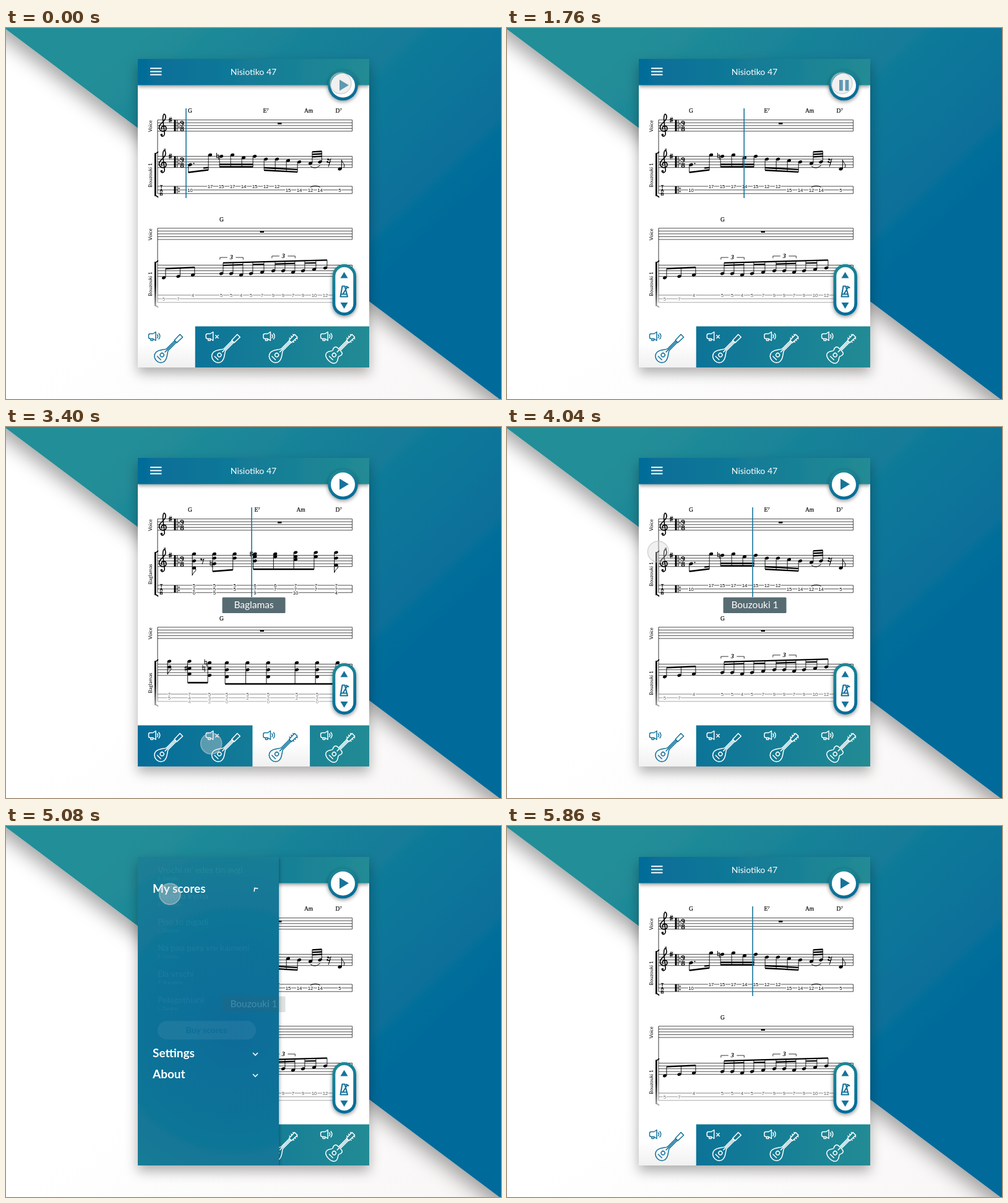
These frames come from a looping animation (800x600 px, 7860 ms). An HTML page:

```html
<!DOCTYPE html>
<html lang="en">
<head>
<meta charset="utf-8">
<title>Score player</title>
<style>
html, body { margin: 0; width: 100%; height: 100%; overflow: hidden; background: #fff; }
svg { display: block; width: 800px; height: 600px; }
text { font-family: Lato, sans-serif; }
.serif { font-family: "Liberation Serif", serif; }
.sans { font-family: "Liberation Sans", sans-serif; }
.bold { font-weight: bold; }
.mid { text-anchor: middle; }
.line { fill: none; stroke: currentColor; stroke-width: 1.5; stroke-linejoin: round; stroke-linecap: round; }
.thick { stroke-width: 2.1; }
.tab { color: #fff; }
.tab.on { color: #11729b; }
.tab rect { visibility: hidden; }
.tab.on rect { visibility: visible; }
</style>
</head>
<body>
<svg viewBox="0 0 800 600">
  <defs>
    <linearGradient id="sky" gradientUnits="userSpaceOnUse" x1="230" y1="0" x2="610" y2="410">
      <stop stop-color="#238e97"/><stop offset="1" stop-color="#036b9a"/>
    </linearGradient>
    <linearGradient id="bar" gradientUnits="userSpaceOnUse" x1="213" y1="0" x2="587" y2="0">
      <stop stop-color="#056c99"/><stop offset="1" stop-color="#228b94"/>
    </linearGradient>
    <linearGradient id="ring" x1="0" y1="0" x2=".3" y2="1">
      <stop stop-color="#228b94"/><stop offset="1" stop-color="#056c99"/>
    </linearGradient>
    <linearGradient id="paper" x1="0" y1="0" x2="1" y2="1">
      <stop offset=".5" stop-color="#fff"/><stop offset="1" stop-color="#f8f6f5"/>
    </linearGradient>
    <linearGradient id="chosen" x1="0" y1="0" x2="0" y2="1">
      <stop offset=".4" stop-color="#fff"/><stop offset="1" stop-color="#f0f0f0"/>
    </linearGradient>
    <linearGradient id="fade" x1="0" y1="0" x2="0" y2="1">
      <stop stop-color="#fff" stop-opacity="0"/><stop offset="1" stop-color="#fff" stop-opacity=".9"/>
    </linearGradient>
    <radialGradient id="drawer" gradientUnits="userSpaceOnUse" cx="370" cy="330" r="320">
      <stop stop-color="#076c99"/><stop offset=".5" stop-color="#0e7397"/><stop offset="1" stop-color="#1d8095"/>
    </radialGradient>
    <clipPath id="screen"><rect x="213" y="50" width="374" height="499"/></clipPath>
    <filter id="far" x="-20%" y="-20%" width="140%" height="140%">
      <feDropShadow dx="-3" dy="15" stdDeviation="15" flood-opacity=".35"/>
    </filter>
    <filter id="lift" x="-20%" y="-20%" width="140%" height="140%">
      <feDropShadow dx="0" dy="9" stdDeviation="10" flood-opacity=".32"/>
    </filter>
    <filter id="near" x="-30%" y="-30%" width="160%" height="170%">
      <feDropShadow dx="0" dy="2" stdDeviation="3" flood-opacity=".45"/>
    </filter>
  </defs>

  <rect width="800" height="600" fill="url(#paper)"/>
  <path d="M-60-43V-60H860V647Z" fill="url(#sky)" filter="url(#far)"/>
  <rect x="213" y="50" width="374" height="499" fill="#fff" filter="url(#lift)"/>

  <g clip-path="url(#screen)">
    <g id="common"></g>
    <g id="bouzouki"></g>
    <g id="baglamas"></g>
    <rect x="237" y="415" width="325" height="50" fill="url(#fade)"/>
    <path id="cursor" d="M0 130V275" stroke="#17739c" stroke-width="1.6"/>
    <rect x="213" y="50" width="374" height="42.5" fill="url(#bar)" filter="url(#near)"/>
    <path d="M233 65.3h18.5M233 70.4h18.5M233 75.5h18.5" stroke="#fff" stroke-width="2"/>
    <text class="mid" x="400" y="76" font-size="14" fill="#fff">Nisiotiko 47</text>
    <rect x="213" y="482.5" width="374" height="67" fill="url(#bar)"/>
    <g id="tabs"></g>

    <g id="menu">
      <rect x="213" y="50" width="228" height="499" fill="url(#drawer)" filter="url(#near)"/>
      <g id="list" fill="#fff"></g>
      <g class="bold" fill="#fff" font-size="19">
        <text x="237" y="107.5">My scores</text>
        <g id="rest"><text x="237" y="438">Settings</text><text x="237" y="472">About</text>
          <path d="M399 430.500l4 4 4-4M399 465l4 4 4-4" fill="none" stroke="#fff" stroke-width="1.6"/></g>
      </g>
      <path id="chevron" d="M-4-2L0 2 4-2" fill="none" stroke="#fff" stroke-width="1.6"/>
    </g>
  </g>

  <g filter="url(#near)">
    <circle cx="544.5" cy="93" r="24.3" fill="url(#ring)"/>
    <circle cx="544.5" cy="93" r="19.5" fill="#fff"/>
  </g>
  <path id="play" d="M539 83.5V101.5L554 92.5Z" fill="#17739a"/>
  <path id="pause" d="M537 84h5.8v17.5H537ZM546.6 84h5.8v17.5h-5.8Z" fill="#17739a"/>

  <g filter="url(#near)">
    <rect x="527.5" y="382" width="38.5" height="83" rx="19.2" fill="url(#ring)"/>
    <rect x="532.3" y="386.8" width="29" height="73.4" rx="14.5" fill="#fff"/>
  </g>
  <g fill="#17739a" color="#17739a">
    <path d="M540.5 404.5H552.5L546.5 394.5ZM540.5 444H552.5L546.5 454Z"/>
    <path class="line thick" d="M543.5 417.5h4l4.5 17h-11.5ZM541 430.5h10M545 429.5l6.5-10.5M550 418l3.5 2"/>
  </g>

  <g id="toast">
    <rect x="349.5" y="275.5" width="102" height="25.5" rx="1.5" fill="#455b63" fill-opacity=".9"/>
    <text id="toastText" class="mid" x="400.5" y="293" font-size="15.5" fill="#fff"></text>
  </g>
  <circle id="touch" r="17" fill="rgb(215,215,215)" fill-opacity=".38" stroke="rgb(195,195,195)" stroke-opacity=".7" stroke-width="1.4"/>
</svg>

<script>
const $ = id => document.getElementById(id);

// Engraving helpers
const GAP = 4.55, TAB_GAP = 5.9;
const path = (d, w = 1, fill = 'none') => `<path d="${d}" fill="${fill}" stroke="#000" stroke-width="${w}"/>`;
const text = (x, y, s, size, cls = '', extra = '') =>
  `<text x="${x}" y="${y}" font-size="${size}" class="${cls}" ${extra}>${s}</text>`;
const dot = (x, y, r = 1.1) => `<circle cx="${x}" cy="${y}" r="${r}"/>`;
const staff = (y, n = 5, gap = GAP) => {
  let d = `M559.5 ${y}v${(n - 1) * gap}`;
  for (let i = 0; i < n; i++) d += `M245 ${y + i * gap}H559.5`;
  return path(d, .7);
};
const label = (y, s) => text(0, 0, s, 8, 'mid', `transform="translate(235.5 ${y}) rotate(-90)"`);
const chord = (x, y, s, sup = '') =>
  text(x, y, `${s}<tspan font-size="6.5" dy="-3">${sup}</tspan>`, 9.5, 'serif', 'stroke="#000" stroke-width=".2"');
const head = (x, y) => `<ellipse rx="3.2" ry="2.3" transform="translate(${x} ${y}) rotate(-20)"/>`;
const sharp = (x, y) => path(`M${x - 1} ${y - 4.5}v9.5M${x + 1.2} ${y - 5}v9.5`, .7) +
  path(`M${x - 2.6} ${y - 1}l5.4-1.4M${x - 2.6} ${y + 2.2}l5.4-1.4`, 1.4);
const natural = (x, y) => path(`M${x - 1.5} ${y - 5.5}v8l3.2-1M${x + 1.7} ${y + 5.5}v-8l-3.2 1`, 1);
const eighthRest = (x, y) => dot(x - 2, y - 3, 1.4) + path(`M${x - 2} ${y - 2}q3 1 4.5-2l-3 9`);
const clef = y => `<g transform="translate(254 ${y + 3 * GAP})">` +
  path('M-1.5 2C-4 0-2.5-4 1-4C6-4 6.5 4 .5 4.5C-5 5-8 0-5.5-5C-3.5-9 4-12 4-18C4-22 2-24 .8-22.5C-1-20-.5-14 0-10L2.2 8C2.6 12-1 14-3 12', 1.6) +
  dot(-2.6, 10.5, 1.9) + '</g>';
const repeat = (y, h) => path(`M273 ${y}v${h}`, 3) + path(`M276.8 ${y}v${h}`, .9) +
  dot(279.5, y + h / 2 - 2.6) + dot(279.5, y + h / 2 + 2.6);
const column = (x, y, s, step, size, cls) =>
  [...s].map((c, i) => text(x, y + i * step, c, size, `mid bold ${cls}`)).join('');
const opening = y => clef(y) + sharp(265.5, y) + repeat(y, 4 * GAP) + column(284.5, y + 9, '98', 9.2, 13, 'serif');
const bracket = (y, h) => path(`M241.3 ${y}v${h}`, 2.6) + path(`M240 ${y}q4 0 6-3M240 ${y + h}q4 0 6 3`, 1.4);

// A run spells evenly spaced chords with pitch letters and yields [x, y, y...] per chord
const pitchY = (letter, top) => top + (10 - 'CDEFGABcdefgab'.indexOf(letter)) * GAP / 2;
const run = (spelling, x, dx, top) =>
  spelling.split(' ').map((letters, i) => [x + i * dx, ...[...letters].map(c => pitchY(c, top))]);

// Frets of one note run down the strings, separated by commas
const tab = (notes, frets, y) => frets.split(' ').map((cell, i) => cell.split(',').map((s, row) =>
  s && text(notes[i][0], y + row * TAB_GAP + 2.8, s, 7.8, 'mid sans', 'stroke="#fff" stroke-width="2.6" paint-order="stroke"')
).join('')).join('');

function beamed(notes, up, y0, y1, count = 1) {
  const side = up ? 2.9 : -2.9;
  const a = notes[0][0] + side, b = notes[notes.length - 1][0] + side;
  let out = '';
  for (const [x, ...ys] of notes) {
    const end = y0 + (y1 - y0) * (x + side - a) / (b - a);
    const from = up ? Math.max(...ys) : Math.min(...ys);
    out += ys.map(y => head(x, y)).join('') + path(`M${x + side} ${from}V${end}`, .9);
  }
  for (let k = 0; k < count; k++) {
    const inset = (up ? 4 : -4) * k;
    out += path(`M${a} ${y0 + inset}L${b} ${y1 + inset}`, 2.3);
  }
  return out;
}
const flagged = ([x, ...ys]) => ys.map(y => head(x, y)).join('') +
  path(`M${x - 2.9} ${ys[0]}V${Math.max(...ys) + 12}q1-4 4-6t1-6`);
const triplet = (x, y) => path(`M${x - 18.5} ${y + 4.5}v-3.5h12M${x + 7} ${y + 1}h12v3.5`, .8) +
  text(x, y + 3.8, '3', 10, 'mid bold serif', 'font-style="italic"');

const VOICE = [148.7, 323.8], LEAD = [207.5, 383.5], TABS = [256, 432];

$('common').innerHTML =
  [0, 1].map(i => staff(VOICE[i]) + staff(LEAD[i]) + staff(TABS[i], 3, TAB_GAP) + label(VOICE[i] + 10, 'Voice') +
    path(`M245 ${VOICE[i]}V${TABS[i] + 2 * TAB_GAP}`, .8) + bracket(LEAD[i] - 4.5, 68 + i * 2)).join('') +
  opening(VOICE[0]) + opening(LEAD[0]) + repeat(TABS[0], 2 * TAB_GAP) +
  text(256.5, 199, '8', 6.5, 'mid bold serif') + column(251, 258.8, 'TAB', 6.3, 7.6, 'sans') +
  path('M439 154.4h6.4M410.5 329.6h6.4', 2.6) +
  chord(294, 137, 'G') + chord(532.5, 137, 'D', '7') + chord(345, 312.8, 'G');

function bouzouki() {
  const [top, low] = LEAD;
  const a = run('G g', 297.5, 32.5, top), b = run('f g e f', 348, 18, top), c = run('d d c B', 420, 18, top);
  const d = run('A B', 492, 15.5, top), e = run('D', 539.5, 0, top);
  const intro = run('D E F', 255, 23.5, low);

  // Triplets are set tighter than pairs; each group has its own second beam
  const beamY = x => 379.8 - (x - 351) * .0268;
  let x = 348, climb = [], inner = '';
  for (const group of 'GGF GA BBA Bc d'.split(' ')) {
    const dx = group.length === 3 ? 16 : 18;
    const notes = run([...group].join(' '), x, dx, low);
    const x0 = x + 2.9, x1 = x0 + dx * (group.length - 1);
    inner += path(`M${x0} ${beamY(x0) + 4}L${x1} ${beamY(x1) + 4}`, 2.2);
    if (group.length === 3) inner += triplet(x + 16.3, beamY(x) - 9.8);
    climb = climb.concat(notes);
    x += dx * group.length;
  }
  return label(238, 'Bouzouki 1') + label(414, 'Bouzouki 1') + chord(415.5, 137, 'E', '7') + chord(482, 137, 'Am') +
    beamed(a, false, 233.5, 229.5) + path('M319 226.6l8-1', 2.2) + dot(303.5, 219) + natural(342, pitchY('f', top)) +
    beamed(b, false, 224.5, 224.5, 2) + beamed(c, false, 230, 232.8, 2) + beamed(d, true, 200.3, 199.5, 3) +
    path('M492 223.5q8 6 15.5-1.5M492 257.5q8-4.5 15.5 0') +
    eighthRest(522.5, 215.5) + eighthRest(521.5, 219.5) +
    head(...e[0]) + path('M542.4 228V213q.5 4 3 6t.5 7') +
    tab([...a, ...b, ...c, ...d, ...e], ',10 17 15 17 14 15 12 12 ,15 ,14 ,12 ,14 ,5', TABS[0]) +
    beamed(intro, true, 389.3, 387) + beamed(climb, true, beamY(351), beamY(519)) + inner +
    tab([...intro, ...climb], ',5 ,7 4 5 5 4 5 7 9 9 7 9 10 12', TABS[1]);
}

function baglamas() {
  const [top, low] = LEAD;
  const first = run('gBD gdG gd geB ge aec ae adF', 304, 32.8, top);
  const start = run('ad acF gcE', 264, 32.5, low);
  const vamp = [...run('gBD gB gBD', 357, 33.4, low), ...run('gB gBD gB', 470, 33, low)];
  return label(238, 'Baglamas') + label(414, 'Baglamas') + chord(401.5, 137, 'E', '7') + chord(469.5, 137, 'Am') +
    flagged(first[0]) + eighthRest(317.5, 217) + natural(331.5, pitchY('G', top)) +
    beamed(first.slice(1, 3), false, 233.5, 231) + sharp(396.5, pitchY('g', top)) +
    beamed(first.slice(3, 7), false, 230, 230) + flagged(first[7]) +
    tab(first, '5,2,0 5,5,5 5,5 6,7,9 6,7 7,7,10 7,7 7,7,4', TABS[0]) +
    flagged(start[0]) + sharp(291, pitchY('c', low)) + natural(322.5, pitchY('g', low)) + natural(319.5, pitchY('c', low)) +
    beamed(start.slice(1), false, 413.5, 413.5) + beamed(vamp, false, 415.5, 415.5) +
    tab([...start, ...vamp], '7,5 7,4,4 5,3,2 5,2,0 5,2 5,2,0 5,2 5,2,0', TABS[1]);
}
$('bouzouki').innerHTML = bouzouki();
$('baglamas').innerHTML = baglamas();

// Instrument tabs
const lute = 'M-2-25C-4-20-10-16-10-9A10 9 0 0 0 10-9C10-16 4-20 2-25';
const guitar = 'M-2-25C-10-26-9-20-7-17C-6-14-11-13-11-7C-11 2 11 2 11-7C11-13 6-14 7-17C9-20 10-26 2-25';
const neck = 'M-2-25V-44M2-25V-44M-2.8-44H2.8L3.2-57H-3.2ZM0-20V-44M-4-6H4M3-13A3 3 0 1 1-3-13A3 3 0 1 1 3-13';
const pegs = [-47, -51, -55].map(y => `M-5 ${y}h1M5 ${y}h-1`).join('');
const horn = 'M230.5 497Q230.5 494.5 233 494.5H237.5L242 491.5V505.5L237.5 502.5H233Q230.5 502.5 230.5 500ZM234 503v2.500h3.500v-2';
const muted = 'M246 497l4.5 4.5M250.5 497l-4.5 4.5';
const waves = 'M244.5 496q2 2.500 0 5M247 494q3.500 4.500 0 9';
$('tabs').innerHTML = [lute, lute, lute, guitar].map((body, i) => `<g class="tab" transform="translate(${i * 92.7} 0)">
  <rect x="213" y="482" width="92.7" height="67.500" fill="url(#chosen)"/>
  <path class="line" d="${horn}${i === 1 ? muted : waves}"/>
  <path class="line" transform="translate(243 538) rotate(45)" d="${body}${neck}${i > 1 ? pegs : ''}"/></g>`).join('');

// Side menu
const songs = ['Vrochi m\' edes tin avgi', 'Fteroto kyma', 'Piso to pigadi', 'Na pao pera vre kaimeni', 'Ela vrachi', 'Pelagothiani'];
const authors = ['S. Ordalis', 'P. Vrandelis', 'L. Denkas'];
$('list').innerHTML = songs.map((name, i) =>
  text(245, 140 + i * 42, name, 14) + text(245, 152 + i * 42, authors[i % 3], 8)).join('') +
  '<rect x="245" y="379" width="159" height="30" rx="15"/>' +
  text(324, 398.5, 'Buy scores', 14, 'mid bold', 'fill="#0b6e98"');

// Motion
const LOOP = 7860;
const progress = (t, a, b) => Math.min(1, Math.max(0, (t - a) / (b - a)));
const sine = p => .5 - .5 * Math.cos(Math.PI * p);
const late = p => p ** 2.6;
const easeOut = p => 1 - (1 - p) ** 3;
const mix = (a, b, p) => a + (b - a) * p;
const show = (id, on) => $(id).setAttribute('visibility', on ? 'visible' : 'hidden');
const move = (id, x, y, more = '') => $(id).setAttribute('transform', `translate(${x} ${y}) ${more}`);
const alpha = (id, a) => $(id).setAttribute('opacity', a);
const tabs = [...$('tabs').children];

const moves = [
  { from: 2240, to: 2780, x: 426, y: 512, easeX: late },
  { from: 3150, to: 3630, x: 250, y: 512 },
  { from: 3870, to: 4140, x: 242, y: 71 },
  { from: 4520, to: 4820, x: 265, y: 110 }
];
const touchAt = t => moves.reduce(([x, y], m) => {
  const p = progress(t, m.from, m.to);
  return [mix(x, m.x, (m.easeX || sine)(p)), mix(y, m.y, sine(p))];
}, [541, 89.5]);

function draw(t) {
  const playing = t >= 500 && t < 1920;
  show('play', !playing);
  show('pause', playing);
  move('cursor', mix(291, 397, progress(t, 700, 1920)), 0);

  const second = t >= 2980 && t < 3650;
  show('bouzouki', !second);
  show('baglamas', second);
  tabs.forEach((el, i) => el.classList.toggle('on', i === (second ? 2 : 0)));
  $('toastText').textContent = t < 3650 ? 'Baglamas' : 'Bouzouki 1';
  alpha('toast', progress(t, 2980, 3160) * (1 - progress(t, 4930, 5120)));

  const open = easeOut(progress(t, 4340, 4640)) - sine(progress(t, 5580, 5860));
  show('menu', open > 0);
  move('menu', mix(-240, 0, open), 0);
  const grow = easeOut(progress(t, 4880, 5380));
  move('list', 0, mix(-298, 0, grow));
  move('rest', 0, mix(-298, 0, grow));
  alpha('list', progress(t, 5062, 5360));
  move('chevron', 403, 102, `rotate(${180 * grow})`);

  move('touch', ...touchAt(t));
  alpha('touch', 1 - progress(t, 5580, 5720));
}

const start = performance.now();
function tick() {
  draw((performance.now() - start) % LOOP);
  requestAnimationFrame(tick);
}
tick();
</script>
</body>
</html>
```
